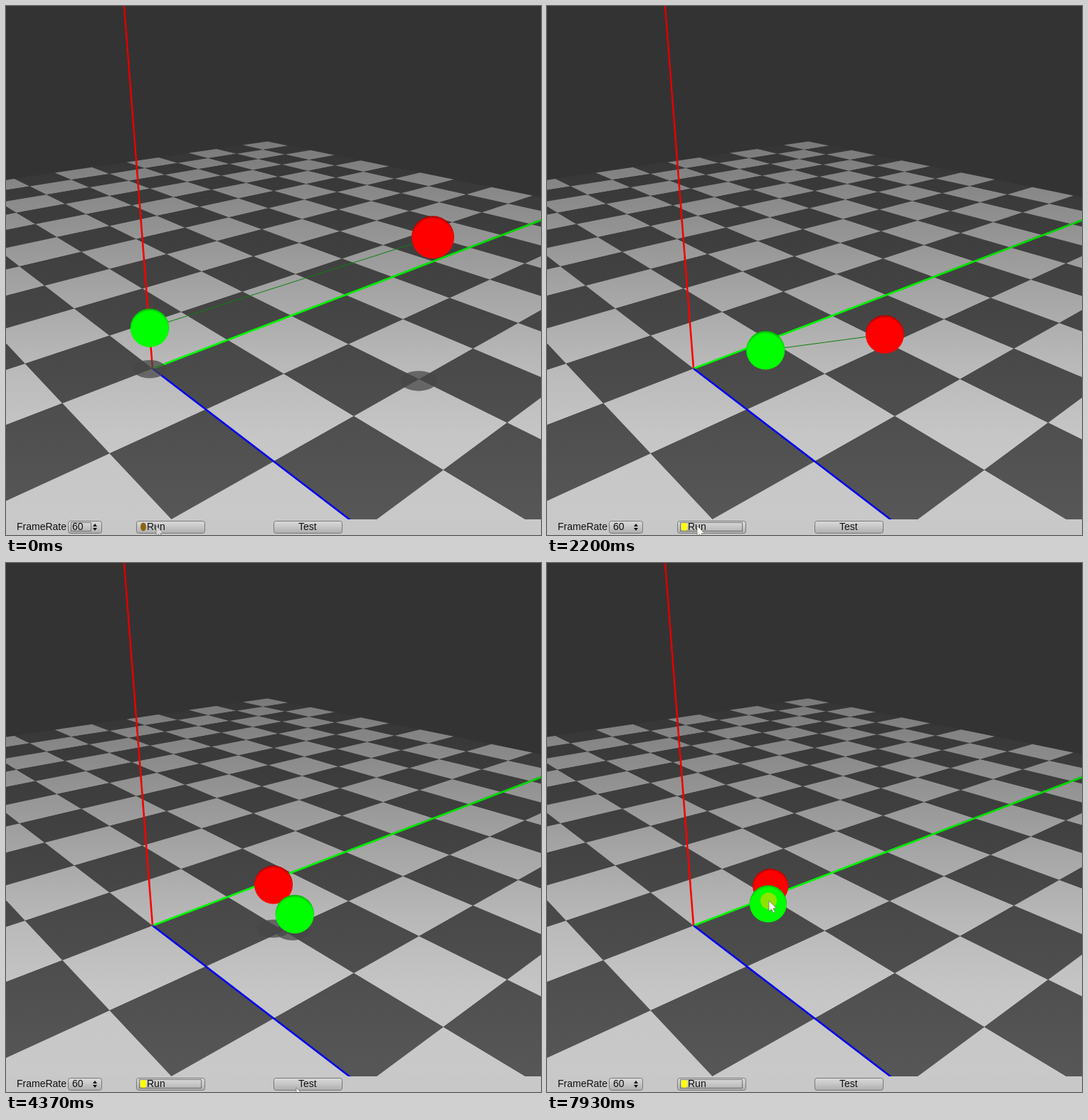
These frames come from a looping animation (752 px wide and 744 px high, 8000 ms). An HTML page with a canvas:

```html
<!DOCTYPE html>
<html lang="en">
<head>
<meta charset="utf-8">
<title>Spring simulation</title>
<style>
html, body { margin: 0; width: 100%; height: 100%; overflow: hidden; background: #c8c8c8; }
canvas { display: block; }
</style>
</head>
<body>
<canvas id="stage" width="752" height="744"></canvas>
<script>
const W = 752, H = 744, FLOOR_END = 722, LOOP = 8000, START = 850;
const HORIZON = 30, ORIGIN = { x: 206, y: 510 };
const ctx = document.getElementById('stage').getContext('2d');

const mix = (a, b, k) => a + (b - a) * k;

// Smooth step from 0 to 1 between two times
function ease(t, from, to) {
  const k = Math.min(1, Math.max(0, (t - from) / (to - from)));
  return k * k * (3 - 2 * k);
}

// Ground grid to screen
const depth = (i, j) => 1 + 0.0921 * i - 0.107 * j;
function project(i, j) {
  const w = depth(i, j);
  return [(ORIGIN.x + 134 * i + 44.7 * j) / w, HORIZON + (ORIGIN.y - HORIZON) / w];
}

function gradient(g, x0, y0, x1, y1, stops) {
  const grad = g.createLinearGradient(x0, y0, x1, y1);
  stops.forEach(([at, color]) => grad.addColorStop(at, color));
  return grad;
}

function polygon(g, points) {
  g.beginPath();
  points.forEach(p => g.lineTo(p[0], p[1]));
  g.closePath();
}

function line(g, x0, y0, x1, y1, style, width) {
  g.strokeStyle = style;
  g.lineWidth = width;
  g.beginPath();
  g.moveTo(x0, y0);
  g.lineTo(x1, y1);
  g.stroke();
}

function drawFloor(g) {
  const light = gradient(g, 0, 190, 0, FLOOR_END, [[0, '#7a7a7a'], [0.58, '#b8b8b8'], [0.78, '#c6c6c6'], [1, '#c9c9c9']]);
  const dark = gradient(g, 0, 190, 0, FLOOR_END, [[0, '#353535'], [0.6, '#4a4a4a'], [1, '#575757']]);
  for (let i = -10; i < 10; i++) {
    for (let j = -10; j < 10; j++) {
      const cell = [[i, j], [i + 1, j], [i + 1, j + 1], [i, j + 1]];
      if (cell.some(p => depth(...p) < 0.05)) continue;
      polygon(g, cell.map(p => project(...p)));
      g.fillStyle = (i + j) % 2 ? light : dark;
      g.fill();
    }
  }
}

function drawAxes(g) {
  const { x, y } = ORIGIN;
  line(g, x, y, 166, 0, gradient(g, 0, 0, 0, y, [[0, '#d60000'], [1, '#ff0000']]), 2.6);
  line(g, x, y, 754, 300.5, gradient(g, x, 0, W, 0, [[0, '#00ff00'], [0.4, '#00f400'], [1, '#00d400']]), 2.6);
  line(g, x, y, 484, 723, '#0000f0', 2.6);
}

function drawButton(g, x, w) {
  g.beginPath();
  g.roundRect(x + 0.5, 724.5, w - 1, 17, 3);
  g.fillStyle = gradient(g, 0, 724, 0, 742, [[0, '#dcdcdc'], [0.45, '#c8c8c8'], [1, '#acacac']]);
  g.fill();
  g.strokeStyle = '#777';
  g.lineWidth = 1;
  g.stroke();
}

function label(g, text, x) {
  g.font = '14px "Liberation Sans", Arial, sans-serif';
  g.fillStyle = '#101010';
  g.fillText(text, x, 737);
}

function focusBox(x, w) {
  ctx.strokeStyle = '#222';
  ctx.lineWidth = 1;
  ctx.setLineDash([1, 1]);
  ctx.strokeRect(x + 0.5, 726.5, w, 12);
  ctx.setLineDash([]);
}

function drawPanel(g) {
  g.fillStyle = '#c8c8c8';
  g.fillRect(0, FLOOR_END, W, H - FLOOR_END);
  drawButton(g, 87, 48);
  drawButton(g, 183, 97);
  drawButton(g, 376, 97);
  label(g, 'FrameRate', 15);
  label(g, '60', 93);
  label(g, 'Test', 411);
  g.fillStyle = '#111';
  for (const side of [-1, 1]) {
    const base = 733 + side;
    polygon(g, [[122, base], [125, base + 4 * side], [128, base]]);
    g.fill();
  }
}

const backdrop = document.createElement('canvas');
backdrop.width = W;
backdrop.height = H;
(g => {
  g.fillStyle = '#333';
  g.fillRect(0, 0, W, H);
  drawFloor(g);
  drawAxes(g);
  drawPanel(g);
})(backdrop.getContext('2d'));

// Vector from green to red: a damped swing that settles into a slowly turning contact
function ballGap(t) {
  const s = Math.max(0, t - START);
  const u = s < 620 ? s * s / 1240 : s - 310;
  const swingX = 398 / (1 + 0.0011 * u) * Math.cos(Math.PI * u / 560);
  const swingY = -0.32 * swingX + 0.03 * u;
  const angle = 3.36 + 0.73 * Math.exp(-Math.max(0, t - 4370) / 800);
  const settled = ease(t, 3240, 4300);
  return [mix(swingX, 51 * Math.cos(angle), settled), mix(swingY, 51 * Math.sin(angle), settled)];
}

function pose(t) {
  const fall = ease(t, START, 2200), landed = ease(t, START, 1600);
  const lift = ease(t, 3400, 4300), sink = ease(t, 4300, 5900);
  const drag = ease(t, 6550, 7930);
  const [dx, dy] = ballGap(t);

  const mid = { x: 401 - 10 * fall - 9 * sink, y: 389 + 84 * fall + 25.5 * sink };
  const red = {
    x: mid.x + dx / 2 - 43 * drag,
    y: mid.y + dy / 2 - 38 * drag,
    r: 30 - 3 * landed - 2 * drag,
    drop: mix(202, 8, landed) + 13 * lift + 41 * Math.exp(-(((t - 4400) / 500) ** 2)),
    shift: -20 * (1 - landed),
    color: '#ff0000', rim: '#a00000'
  };
  const green = {
    x: mid.x - dx / 2 - 96 * drag,
    y: mid.y - dy / 2 - 25 * drag,
    r: 27.2 - drag,
    drop: mix(58, 6, landed) + 18 * lift - 15 * drag,
    shift: -3 * lift,
    color: '#00ff00', rim: '#00a800'
  };

  const nudge = ease(t, 2540, 3240), across = ease(t, 3400, 4370);
  const up = ease(t, 4370, 5200), back = ease(t, 4700, 5800);
  const pointer = {
    x: 211 + 7 * nudge + 190 * across + 70 * up - 73 * back - 93 * drag,
    y: 731 + 7 * across - 100 * up - 135 * back - 28 * drag
  };
  return { red, green, pointer };
}

function drawShadow({ x, y, r, drop, shift }) {
  ctx.fillStyle = 'rgba(70,70,70,0.72)';
  ctx.beginPath();
  ctx.ellipse(x + shift, y + drop, r * 0.86, r * 0.47, 0, 0, Math.PI * 2);
  ctx.fill();
}

function drawBall({ x, y, r, color, rim }) {
  const g = ctx.createRadialGradient(x, y + r * 0.09, 0, x, y + r * 0.09, r * 1.1);
  g.addColorStop(0, color);
  g.addColorStop(0.85, color);
  g.addColorStop(1, rim);
  ctx.fillStyle = g;
  ctx.beginPath();
  ctx.arc(x, y, r, 0, Math.PI * 2);
  ctx.fill();
}

function drawRunState(running) {
  ctx.beginPath();
  if (running) {
    ctx.roundRect(189, 727, 8, 11, 3);
    ctx.fillStyle = '#ffff00';
  } else {
    ctx.ellipse(193, 732.5, 4, 6, 0, 0, Math.PI * 2);
    ctx.fillStyle = '#8b6510';
  }
  ctx.fill();
  label(ctx, 'Run', 198);
  if (running) focusBox(187, 87);
  else focusBox(91, 28);
}

const arrow = [[0, 0], [0, 15], [3.5, 11.8], [6, 17], [8.5, 16], [6, 10.8], [10.5, 10.5]];
function drawPointer({ x, y }, running) {
  polygon(ctx, arrow.map(p => [x + p[0], y + p[1]]));
  ctx.fillStyle = running ? '#fafaf0' : '#d4d4d4';
  ctx.fill();
  ctx.strokeStyle = '#777';
  ctx.lineWidth = 0.8;
  ctx.stroke();
}

function render(t) {
  const running = t >= START;
  const { red, green, pointer } = pose(t);
  const balls = [red, green].sort((a, b) => a.y - b.y);

  ctx.drawImage(backdrop, 0, 0);
  balls.forEach(drawShadow);
  line(ctx, red.x, red.y, green.x, green.y, '#0c800c', 1);
  balls.forEach(drawBall);

  if (Math.hypot(pointer.x - green.x, pointer.y - green.y) < green.r) {
    ctx.fillStyle = '#8ce400';
    ctx.beginPath();
    ctx.arc(pointer.x - 0.5, pointer.y, 11.5, 0, Math.PI * 2);
    ctx.fill();
  }
  drawRunState(running);
  drawPointer(pointer, running);
}

function tick(now) {
  render(now % LOOP);
  requestAnimationFrame(tick);
}
render(0);
requestAnimationFrame(tick);
</script>
</body>
</html>
```
